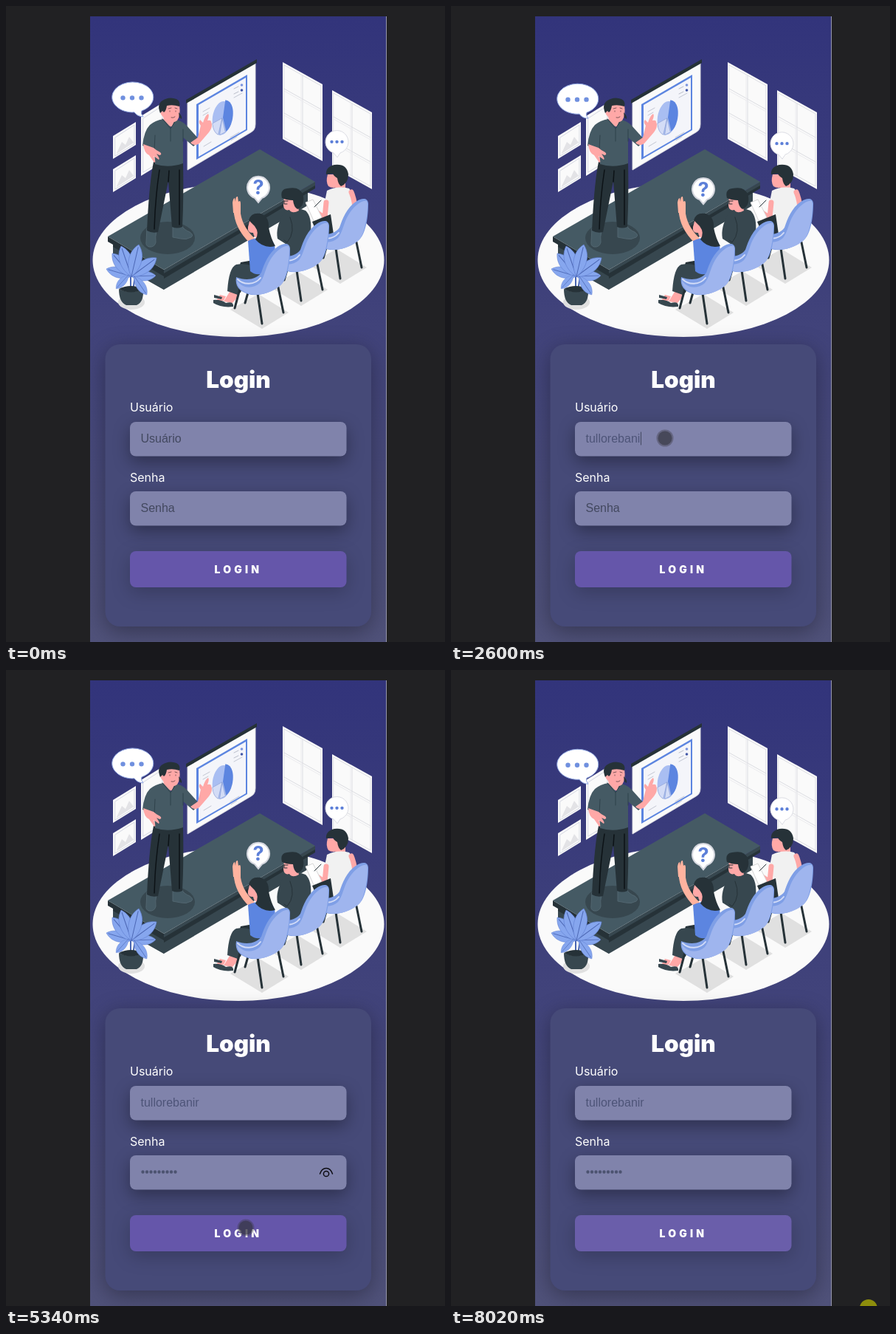
Animation of 595 by 861 pixels, one loop 8.05 s. Source, as an HTML page:

```html
<!DOCTYPE html>
<html lang="pt">
<head>
<meta charset="utf-8">
<title>Login</title>
<style>
html, body { margin: 0; height: 100%; overflow: hidden; background: #212123 }
svg { display: block }
text { font-family: Inter, "Open Sans", sans-serif; fill: #fff }
.in { font: 16px "Liberation Sans", Arial, sans-serif; fill: #42485f }
.box { filter: drop-shadow(0 8px 11px #0005) }
#button { filter: drop-shadow(0 7px 12px #0003) }
.d { fill: #263238 } .g { fill: #37474f } .s { fill: #455a64 }
.k { fill: #ffa8a7 } .w { fill: #fafafa } .b { fill: #5c85e0 } .l { fill: #9fb5ee }
.sh { fill: #e0e0e0 }
.n { fill: none; stroke-linecap: round; stroke-linejoin: round }
</style>
</head>
<body>
<svg width="595" height="861" viewBox="0 0 595 861">
<defs>
  <linearGradient id="sky" x2="0" y2="1">
    <stop stop-color="#32347b"/><stop offset="1" stop-color="#50527a"/>
  </linearGradient>
  <clipPath id="phone"><path d="M114 14H516V861H114Z"/></clipPath>
  <g id="frame">
    <path class="w" d="M145 176L176 157V188L145 207Z"/>
    <path class="n" stroke="#d5d8e2" d="M148 178L174 161V187L148 203Z"/>
    <path fill="#e3e3e6" d="M150 199L157 184L162 188L167 177L173 185L150 200Z"/>
  </g>
  <g id="window">
    <path class="w" d="M375 76L429 106V210L375 180Z"/>
    <path class="n" stroke="#dcdde2" d="M377 80L427 108V206L377 178ZM402 94V192M377 112L427 140M377 145L427 173"/>
    <path class="n" stroke="#ececef" d="M400 93V191M377 115L427 143M377 148L427 176"/>
  </g>
  <g id="chair">
    <path class="sh" d="M304 411L342 390L383 415L347 437Z"/>
    <path class="n" stroke="#263238" stroke-width="3" d="M317 383L310 409M341 389L347 430M369 381L376 415M328 388L324 402"/>
    <path fill="#7f9fe6" d="M312 367C310 379 316 386 328 390C343 394 358 388 371 379C383 370 385 342 385 328C384 320 376 321 368 326C356 334 350 349 346 361C339 371 324 372 312 367Z"/>
    <path class="l" d="M313 372C321 383 335 383 344 375C350 368 352 353 358 344C364 334 375 323 383 325C386 330 382 365 374 376C363 388 342 394 328 389C318 386 313 379 313 372Z"/>
    <path class="n" stroke="#d3dcf7" stroke-width="2" d="M314 370C322 378 337 378 345 368"/>
  </g>
  <g id="leaf">
    <path fill="#86a6ee" stroke="#6382d3" stroke-width=".5" d="M0 0C-6 -6 -12 -23 0 -35C12 -23 6 -6 0 0Z"/>
    <path class="n" stroke="#4c67b4" stroke-width=".8" d="M0 0V-32"/>
  </g>
</defs>

<path fill="url(#sky)" d="M114 14H516V861H114Z"/>
<ellipse class="w" cx="315" cy="344" rx="197.500" ry="104"/>

<!-- room -->
<use href="#frame"/><use href="#frame" y="45"/>
<path class="w" d="M183 149L214 130V211L183 230Z"/>
<path class="n" stroke="#d5d8e2" d="M186 152L212 135V209L186 225Z"/>
<use href="#window"/><use href="#window" x="67" y="38"/>
<path class="w" stroke="#d9d9e0" d="M246 130L338 76V160Q338 168 332 171L246 222Z"/>
<path class="d" d="M244 127L340 72V77L244 132Z"/>
<path class="b" d="M258 133L327 93V168L258 208Z"/>
<path fill="#f4f5fa" d="M261 134L325 97V167L261 204Z"/>
<g transform="rotate(8 294 151)">
  <ellipse fill="#a9bef2" cx="293" cy="152" rx="13" ry="23"/>
  <path class="b" d="M294 151V127C304 127 308 140 307 153Q306 164 301 169Z"/>
  <path fill="#d3dcf6" stroke="#8b9fd5" stroke-width=".6" d="M293 152L281 161Q284 173 291 175ZM293 152V175L300 170Z"/>
</g>
<path class="n" stroke="#c3c7d3" d="M267 143L276 138M267 148L274 144M304 178L316 171M305 182L313 177M268 190L278 184M309 124L320 118"/>
<path class="n" stroke="#b9bdc9" d="M309 112L315 109M309 119L315 116"/>
<circle cx="319.500" cy="107" r="1.800" fill="#7b95df"/><circle cx="319.500" cy="114" r="1.800" fill="#4358a8"/>

<!-- stage -->
<path class="d" d="M138 312L214 357V384L145 345V323L138 319Z"/>
<path class="g" d="M145 326L214 366V384L145 345Z"/>
<path class="g" d="M214 357L419 238V246L409 252V270L214 384Z"/>
<path class="d" d="M214 362L419 243V247L214 369Z"/>
<path class="s" d="M138 312L344 194L419 238L214 357Z"/>
<ellipse class="g" cx="219" cy="314" rx="37" ry="22"/>

<!-- speaker -->
<path class="s" stroke="#526670" d="M191 301L204 304Q202 313 203 320Q201 327 194 326Q189 325 190 319ZM226 299L238 297Q241 303 249 306Q255 310 251 313Q244 317 237 315L226 313Z"/>
<path class="d" d="M200 211H240Q241 260 239 299Q232 302 225 299L220 237L206 306Q198 308 191 304Q194 240 200 211Z"/>
<path class="n" stroke="#0c1216" stroke-width="1.500" d="M221 223L220 238M208 222Q202 262 201 302M235 222V296"/>
<path class="k" d="M213 144L230 150L229 165L214 160Z"/>
<path class="s" d="M213 153Q202 155 195 161Q187 169 185 189L201 194L202 214Q220 220 240 213L240 178L254 190L263 182L244 161Q238 155 229 154L224 165Z"/>
<path class="n" stroke="#2f424b" d="M212 153L223 166L230 155M223 166V183M202 175L201 195M240 167V183"/>
<path class="k" d="M186 187L200 192Q203 195 209 198Q212 201 208 202L204 200Q209 207 207 208L200 203Q204 212 201 212L194 202Q187 199 186 187Z"/>
<path class="k" d="M250 185L260 178L264 162Q260 157 263 154L267 158Q270 148 274 146Q276 148 273 155Q278 154 278 157Q281 163 275 171L262 186Q255 191 250 185Z"/>
<path class="k" d="M212 134Q224 127 235 134Q237 148 232 155Q226 160 217 154L211 148Q207 142 212 142Z"/>
<path class="d" d="M209 145Q204 133 212 128Q221 122 231 126Q237 129 235 136Q226 133 218 135Q217 142 214 144L212 142ZM234 144Q239 149 238 153L235 151Z"/>
<path class="n" stroke="#5b3f45" stroke-width=".8" d="M220 139L224 138M229 138L232 139M222 142V143M230 142V143M224 151Q227 152 229 150"/>

<!-- plant -->
<ellipse class="sh" cx="170" cy="401" rx="18" ry="10"/>
<path class="n" stroke="#4865b2" stroke-width="2" d="M169 385V362M172 385L175 366"/>
<g id="plant"></g>
<path class="g" d="M153 383Q169 391 186 383Q187 401 177 405H163Q153 401 153 383Z"/>
<path class="d" d="M153 383Q169 375 186 383Q169 392 153 383Z"/>
<use href="#leaf" transform="translate(174 366) rotate(146) scale(.86)"/>
<use href="#leaf" transform="translate(166 364) rotate(222) scale(.72)"/>

<!-- audience -->
<path class="k" d="M447 234H460V252H446Z"/>
<path fill="#f1f1f1" d="M435 250Q449 243 465 247Q473 256 471 269L467 306L437 305Q442 282 431 270Z"/>
<path class="n" stroke="#ffa8a7" stroke-width="7" d="M468 252Q474 266 473 284M434 266L432 287L416 276"/>
<path class="k" d="M436 228H452L451 244Q443 248 437 244Q433 238 436 228Z"/>
<path class="d" d="M434 228Q433 218 445 215Q462 213 464 228Q464 240 454 244Q450 241 449 233Q444 230 443 227Z"/>
<path fill="#fff" stroke="#d5d5d5" d="M406 266L416 262L428 286L418 293Z"/>
<path class="n" stroke="#263238" d="M418 272L427 263"/>
<path class="d" d="M415 292L440 282L444 309L425 316Z"/>
<use href="#chair" x="106" y="-61"/>

<path fill="#4b5da8" d="M383 333L409 323L414 342L383 356Z"/>
<path class="g" d="M376 281Q392 271 406 277Q415 285 413 308L406 334L386 341L382 324L368 315Q365 300 376 281Z"/>
<path class="n" stroke="#263238" d="M385 286Q393 306 381 320L377 317"/>
<path class="k" d="M377 257L392 260L397 277Q388 282 384 276Q377 278 376 270Z"/>
<path class="d" d="M374 260Q371 248 381 247Q400 243 403 258Q405 271 395 275Q390 272 389 263Q380 263 374 260Z"/>
<path class="n" stroke="#263238" d="M376 264H382M377 264V268H381"/>
<use href="#chair" x="53" y="-31"/>

<path class="k" d="M305 384L315 386L313 395L307 402L295 400ZM290 391L298 393L295 399L285 399Z"/>
<path class="g" d="M281 398Q291 397 298 402Q309 399 308 407Q292 409 281 402ZM282 391L293 394L292 397L282 395Z"/>
<path class="d" d="M318 347L341 343L347 361L323 372L318 388L306 388Z"/>
<path class="g" d="M300 386Q302 354 312 350Q330 347 345 358L348 369Q334 373 319 371L314 391Z"/>
<path class="n" stroke="#ffb39f" stroke-width="9" d="M313 276Q314 299 334 318"/>
<path fill="#ffb39f" d="M308 280L307 266Q308 260 310 260L311 265Q311 257 314 258L315 265Q318 262 318 268V281Z"/>
<path class="b" d="M328 318Q344 310 359 316Q367 322 364 343L354 360Q340 367 331 359Z"/>
<path class="k" d="M331 288L343 288L346 311Q337 318 335 307Q327 308 328 299Z"/>
<path class="d" d="M329 290Q332 279 345 281Q357 285 356 300Q359 315 365 325Q349 329 338 316Q344 307 337 298Z"/>
<use href="#chair"/>

<!-- speech -->
<g id="bob">
  <path fill="#fff" stroke="#8fa6e2" d="M174 144Q178 150 186 150Q182 146 184 142A28 20.500 0 1 0 174 144Z"/>
  <path class="n" stroke="#7090df" stroke-width="6.400" d="M158.500 124.500h0M171 124.500h0M183.500 124.500h0"/>
  <path fill="#fff" stroke="#d4d6de" stroke-width="2" d="M337 260L342 266L347 260A15 15 0 1 0 337 260Z"/>
  <text x="342" y="255.500" text-anchor="middle" font-size="27" font-weight="700" style="fill:#5c7fd8">?</text>
  <path fill="#fff" stroke="#dcdde4" d="M444 199L449 205L453 199A15.500 15.500 0 1 0 444 199Z"/>
  <path class="n" stroke="#5c7fd8" stroke-width="4.400" d="M441.500 184h0M448.500 184h0M455.500 184h0"/>
</g>

<!-- form -->
<g clip-path="url(#phone)">
  <rect x="134.500" y="458" width="360.500" height="382" rx="20" fill="#464a78" style="filter:drop-shadow(0 7px 15px #0005)"/>
</g>
<path fill="#9797ab" d="M515 14h1V861h-1Z"/>
<text x="315" y="517" text-anchor="middle" font-size="31.500" font-weight="900">Login</text>
<text x="168" y="549" font-size="16">Usuário</text>
<text x="168" y="644" font-size="16">Senha</text>
<g fill="#8083ab">
  <rect class="box" x="168" y="563" width="293.500" height="46.500" rx="8"/>
  <rect class="box" x="168" y="657" width="293.500" height="46.500" rx="8"/>
</g>
<rect id="button" x="168" y="738" width="293.500" height="49" rx="8"/>
<text x="282.500" y="768" font-size="14" font-weight="900" letter-spacing="4.200">LOGIN</text>
<text class="in" id="user" x="182.500" y="591"></text>
<text class="in" id="pass" x="182.500" y="685"></text>
<path class="n" id="dots" stroke="#4c5370" stroke-width="4.400"/>
<path class="n" id="caret" stroke="#42485f"/>
<g class="n" id="eye" stroke="#0c0c12" stroke-width="1.500">
  <path d="M425.500 682Q428 674.500 434 674.500T442.500 682"/><circle cx="434" cy="682" r="3.600"/>
</g>
<g id="cursor">
  <circle r="11.500" fill="#3c3c46" fill-opacity=".4"/><circle r="9.500" fill="#34343f" fill-opacity=".6"/>
</g>
<circle id="spot" r="12" fill="#8d8d0c"/>
</svg>
<script>
const $ = id => document.getElementById(id);
const LOOP = 8050, NAME = "tullorebanir";

// leaf tips, all growing from one crown
const crown = [170, 366];
const tips = [[136, 356], [203, 365], [144, 335], [204, 341], [156, 325], [180, 323]];
$("plant").innerHTML = tips.map(([x, y]) => {
  const dx = x - crown[0], dy = y - crown[1];
  const turn = Math.atan2(dx, -dy) * 180 / Math.PI;
  return `<use href="#leaf" transform="translate(${crown}) rotate(${turn}) scale(${Math.hypot(dx, dy) / 35})"/>`;
}).join("");

// time, x, y
const path = [
  [330, 535, 797], [720, 290, 585], [5000, 290, 585], [5150, 316, 675], [5320, 325, 755],
  [6600, 325, 757], [6680, 308, 650], [6780, 294, 407], [6980, 308, 54], [7250, 308, 54],
  [7400, 325, 140], [7850, 453, 710], [8020, 565, 863], [8050, 590, 890]
];

function cursorAt(t) {
  const i = path.findIndex(p => p[0] > t);
  if (i < 1) return [-50, -50];
  const [t0, x0, y0] = path[i - 1], [t1, x1, y1] = path[i];
  const k = (t - t0) / (t1 - t0);
  return [x0 + (x1 - x0) * k, y0 + (y1 - y0) * k];
}

const typed = (t, start, step, max) => Math.max(0, Math.min(max, Math.floor((t - start) / step)));
const show = (id, on) => $(id).style.display = on ? "" : "none";

function draw(t) {
  const phase = ((t - 252) / 1400 % 1 + 1) % 1;
  const lift = 8 * (1 - Math.abs(2 * phase - 1));
  $("bob").setAttribute("transform", `translate(0 ${lift - 3})`);

  const letters = typed(t, 1720, 80, NAME.length), dots = typed(t, 2950, 175, 9);
  $("user").textContent = letters ? NAME.slice(0, letters) : "Usuário";
  $("user").style.fill = letters ? "#4d5478" : "";
  $("pass").textContent = dots ? "" : "Senha";
  $("dots").setAttribute("d", Array.from({length: dots}, (_, i) => `M${185.5 + 5.5 * i} 679.500h0`).join(""));
  show("eye", dots && t < 5800);

  const onPass = t > 2950;
  const x = onPass ? 183 + 5.5 * dots : 183.5 + (letters ? $("user").getComputedTextLength() : 0);
  $("caret").setAttribute("d", `M${Math.round(x) + .5} ${onPass ? 671 : 577}v17`);
  show("caret", t > 1600 && t < 4700);

  $("button").setAttribute("fill", t < 5800 ? "#6556aa" : "#6a5eaa");
  const [cx, cy] = cursorAt(t), outside = cx > 516;
  for (const id of ["cursor", "spot"]) $(id).setAttribute("transform", `translate(${cx} ${cy})`);
  show("cursor", !outside);
  show("spot", outside);
}

const start = performance.now();
function tick() {
  draw((performance.now() - start) % LOOP);
  requestAnimationFrame(tick);
}
tick();
</script>
</body>
</html>
```
